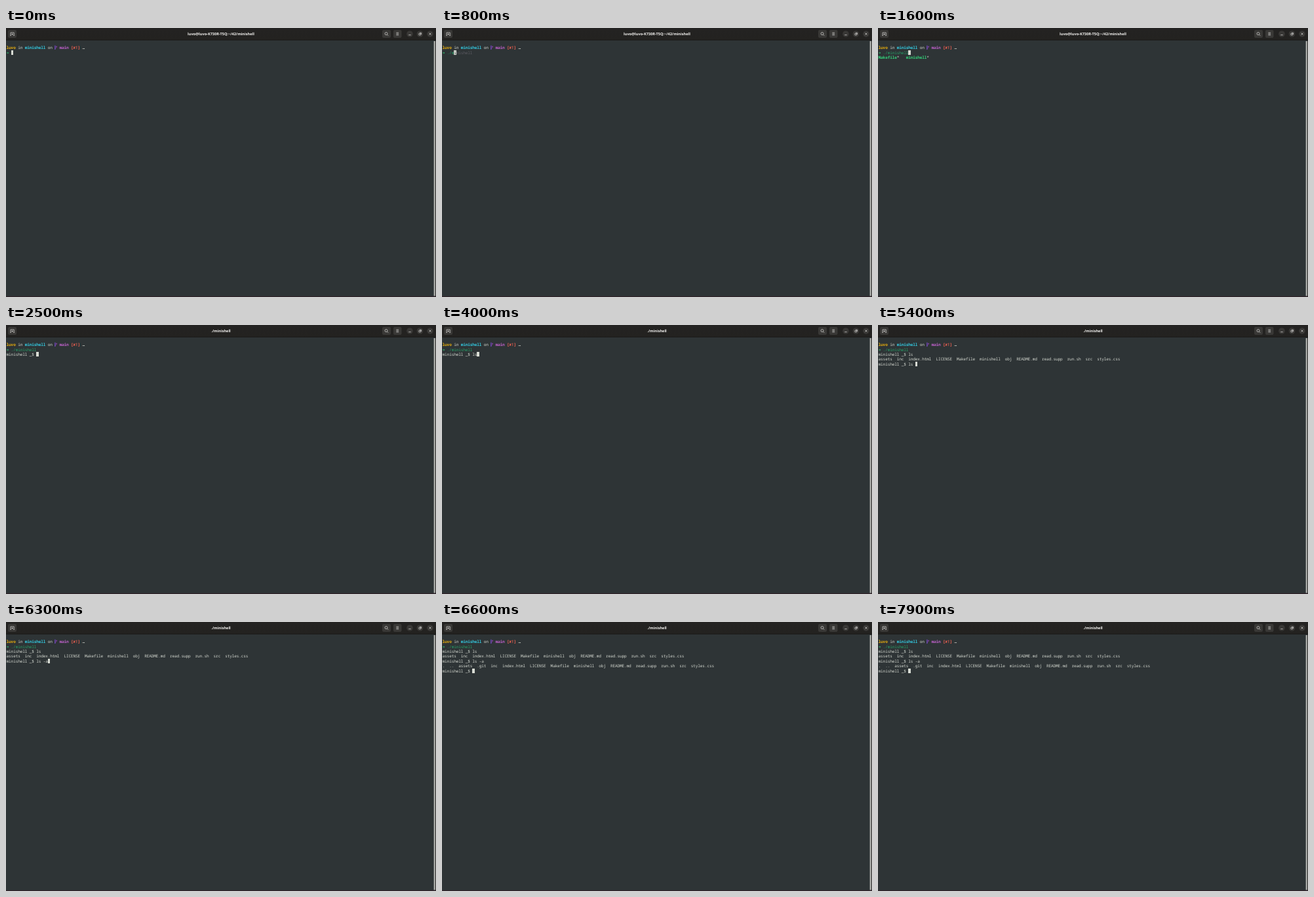
An HTML page that plays this animation: 656 px wide and 410 px high, repeating every 8000 ms.

```html
<!DOCTYPE html>
<html lang="en">
<head>
<meta charset="utf-8">
<title>Terminal session</title>
<style>
:root { --cw: 3.515px; --lh: 7.42px; }
html, body { margin: 0; width: 100%; height: 100%; overflow: hidden; background: #2e3436; }
#stage { position: relative; width: 656px; height: 410px; overflow: hidden; background: #2e3436; text-rendering: geometricPrecision; }
#bar { position: absolute; left: 0; top: 0; width: 656px; height: 19px; background: linear-gradient(#242322, #232220 90%, #1b1b1a); }
.title { position: absolute; left: 0; width: 656px; top: 4px; text-align: center; color: #f4f3f1; font: bold 5.6px/10px "Open Sans", "Noto Sans", sans-serif; white-space: pre; }
#chrome { position: absolute; left: 0; top: 0; }
#term { position: absolute; left: .6px; top: 26.2px; color: #d3d7cf; font: 6.1px/var(--lh) "Noto Sans Mono", "DejaVu Sans Mono", monospace; letter-spacing: -.145px; }
.row, .run { position: absolute; white-space: pre; height: var(--lh); }
.row { left: 0; }
.run { top: 0; }
b { font-weight: 700; }
.y { color: #e9ad0c; } .c { color: #33c7de; } .p { color: #c061cb; }
.r { color: #f66151; } .g { color: #33d17a; } .cmd { color: #26a269; } .hint { color: #5e5c64; }
#cursor { position: absolute; width: var(--cw); height: var(--lh); background: #d8dcd4; color: #2e3436; white-space: pre; }
[hidden] { display: none; }
</style>
</head>
<body>
<div id="stage">
  <div id="bar"></div>
  <div class="title" data-on="0 2400">luvo@luvo-K730R-T5Q:~/42/minishell</div>
  <div class="title" data-on="2400 8000">./minishell</div>
  <svg id="chrome" width="656" height="410" fill="none" stroke="#dedddb" stroke-width=".7">
    <g fill="#393836" stroke="none">
      <rect x="3" y="3" width="13" height="12" rx="2"/>
      <rect x="574" y="3" width="13" height="12" rx="2"/>
      <rect x="591" y="3" width="12.500" height="12" rx="2"/>
      <circle cx="616" cy="9" r="4.800"/>
      <circle cx="631.500" cy="9" r="4.800"/>
      <circle cx="647" cy="9" r="4.800"/>
    </g>
    <path d="M7 11.500V7h5.200v4.500M6.300 11.300H8M11.200 11.300h1.700M9.600 8.300v2.500M8.400 9.500h2.400"/>
    <circle cx="580" cy="8.600" r="2"/>
    <path d="M581.500 10.100l1.700 1.700M595.300 7.200h3.800M595.300 9h3.800M595.300 10.800h3.800"/>
    <path d="M614.300 10.600h3.400M630 8.300h2.600v2.400H630zM631 7.400h2.500v2.500M645.500 7.500l3 3M648.500 7.500l-3 3"/>
    <g stroke="none">
      <rect x="652.600" y="20" width="2.400" height="388.500" fill="#a7a9a5"/>
      <rect x="655.300" y="19" width=".7" height="391" fill="#272625"/>
      <rect y="408.800" width="656" height="1.200" fill="#302229"/>
    </g>
  </svg>
  <div id="term">
    <div class="row" data-row="0"><b class="y">luvo</b> in <b class="c">minishell</b> on   <b class="p">main</b> <b class="r">[✘!]</b><span class="run" data-col="33"><b>…</b></span></div>
    <svg style="position:absolute;left:73.500px;top:0" width="5" height="8" fill="none" stroke="#9141ac" stroke-width=".8">
      <path d="M.9 .6v6.400" stroke="#7d50e6" stroke-width="1"/>
      <path d="M1 5.200C2.800 4.500 3 3.700 3 2.200M2 3l1-1.300L4 3"/>
    </svg>
    <div class="row" data-row="1">
      <b class="run g" data-col="0">➜</b>
      <span class="run cmd" data-col="2" data-on="400 500">.</span>
      <span class="run cmd" data-col="2" data-on="500 700">./<span class="hint">minishell</span></span>
      <span class="run cmd" data-col="2" data-on="700 1600">./m<span class="hint">inishell</span></span>
      <span class="run cmd" data-col="2" data-on="1600 8000">./minishell</span>
    </div>
    <div class="row" data-row="2" data-on="1100 2400"><b class="g">Makefile</b>*   <b class="g">minishell</b>*</div>
    <div class="row" data-row="2" data-on="2500 8000">minishell _$ <span data-on="3900 8000">l</span><span data-on="4000 8000">s</span></div>
    <div class="row" data-row="3" data-on="4600 8000">assets  inc  index.html  LICENSE  Makefile  minishell  obj  README.md  read.supp  run.sh  src  styles.css</div>
    <div class="row" data-row="4" data-on="4600 8000">minishell _$ <span data-on="5200 8000">l</span><span data-on="5300 8000">s</span><span data-on="5400 8000"> </span><span data-on="5700 6000">-</span><span data-on="6200 8000">-</span><span data-on="6300 8000">a</span></div>
    <div class="row" data-row="5" data-on="6600 8000">.  ..  assets  .git  inc  index.html  LICENSE  Makefile  minishell  obj  README.md  read.supp  run.sh  src  styles.css</div>
    <div class="row" data-row="6" data-on="6600 8000">minishell _$ </div>
    <div id="cursor"></div>
  </div>
</div>
<script>
const LOOP = 8000, CW = 3.515, LH = 7.42;
const cursor = document.getElementById('cursor');

// time, row, column, character under the block; row -1 hides it
const moves = [
  [0, 1, 2], [100, -1, 0], [400, 1, 3], [500, 1, 4, 'm'], [700, 1, 5, 'i'],
  [1600, 1, 13], [2200, -1, 0], [2500, 2, 13], [3000, -1, 0], [3600, 2, 13],
  [3900, 2, 14], [4000, 2, 15], [4600, 4, 13], [5200, 4, 14], [5300, 4, 15],
  [5400, 4, 16], [5700, 4, 17], [6000, 4, 16], [6200, 4, 17], [6300, 4, 18],
  [6600, 6, 13], [7200, -1, 0], [7900, 6, 13]
];

document.querySelectorAll('[data-row]').forEach(e => e.style.top = e.dataset.row * LH + 'px');
document.querySelectorAll('[data-col]').forEach(e => e.style.left = e.dataset.col * CW + 'px');
const timed = [...document.querySelectorAll('[data-on]')].map(el => {
  const [from, to] = el.dataset.on.split(' ').map(Number);
  return { el, from, to };
});

function draw() {
  const t = performance.now() % LOOP;
  for (const { el, from, to } of timed) el.hidden = t < from || t >= to;
  const [, row, col, char = ''] = moves.findLast(m => m[0] <= t);
  cursor.hidden = row < 0;
  cursor.style.left = col * CW + 'px';
  cursor.style.top = row * LH + 'px';
  cursor.textContent = char;
  requestAnimationFrame(draw);
}
draw();
</script>
</body>
</html>
```
